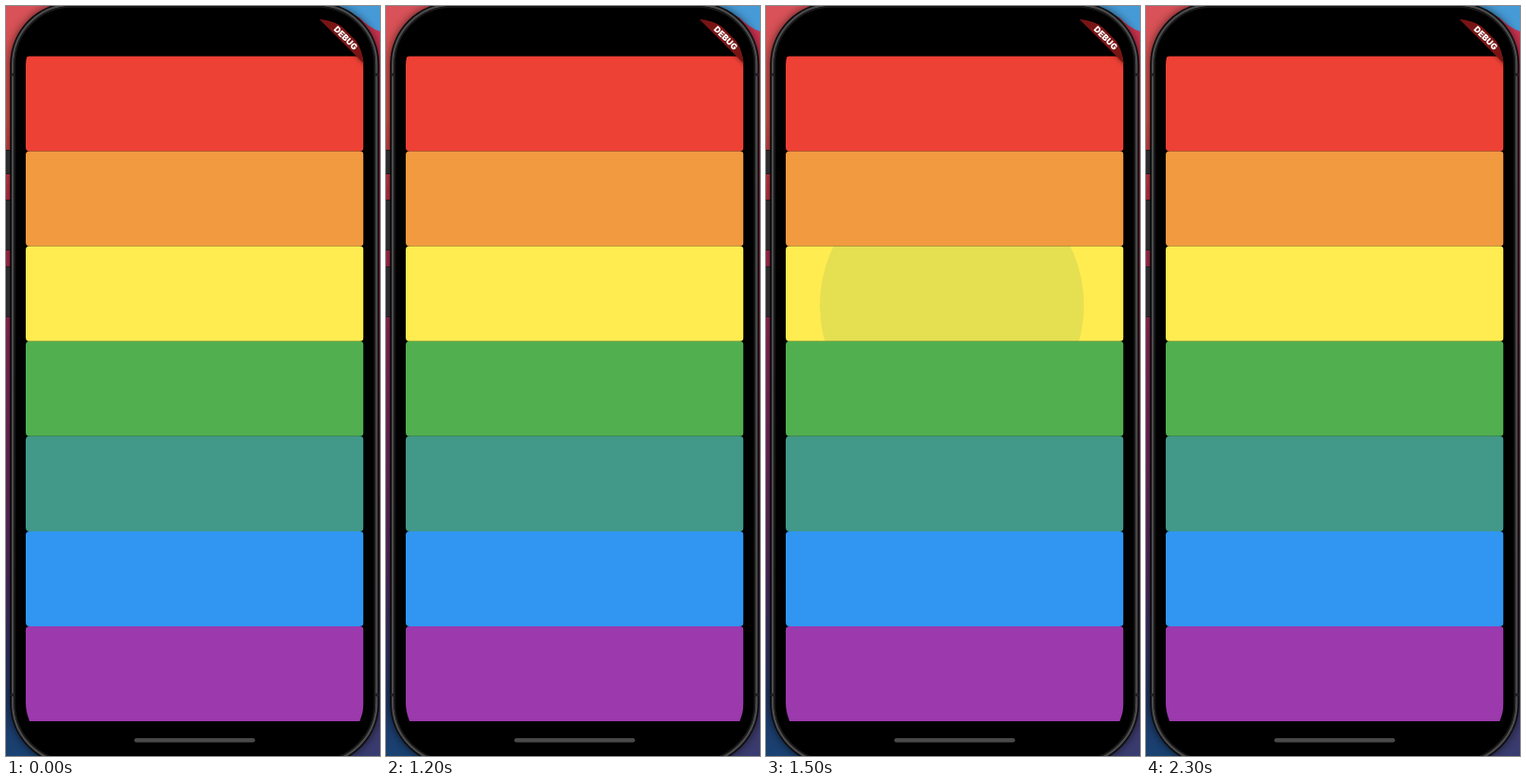
Write an HTML page that moves like this. It is 398 px wide and 798 px high and loops after 2400 ms.

```html
<!DOCTYPE html>
<html lang="en">
<head>
<meta charset="utf-8">
<title>Ripple on colour cards</title>
<style>
html, body { margin: 0; width: 100%; height: 100%; overflow: hidden; background: #000; }
svg { display: block; width: 398px; height: 798px; }
text { font: 900 9px Inter, Roboto, sans-serif; fill: #fff; }
</style>
</head>
<body>
<svg viewBox="0 0 398 798">
  <defs>
    <linearGradient id="left" x2="0" y2="1">
      <stop offset="0" stop-color="#d9525a"/>
      <stop offset=".15" stop-color="#cf5046"/>
      <stop offset=".25" stop-color="#bd3044"/>
      <stop offset=".45" stop-color="#8a2858"/>
      <stop offset=".75" stop-color="#522a60"/>
      <stop offset=".92" stop-color="#203666"/>
      <stop offset="1" stop-color="#194272"/>
    </linearGradient>
    <linearGradient id="right" x2="0" y2="1">
      <stop offset="0" stop-color="#cc3450"/>
      <stop offset=".4" stop-color="#b52c46"/>
      <stop offset=".7" stop-color="#5a2640"/>
      <stop offset="1" stop-color="#383c70"/>
    </linearGradient>
    <clipPath id="screen"><rect x="21" y="14" width="359.5" height="777" rx="50"/></clipPath>
    <filter id="blur" x="-20%" y="-60%" width="140%" height="220%"><feGaussianBlur stdDeviation="2.5"/></filter>
    <filter id="shadow"><feGaussianBlur stdDeviation="5"/></filter>
  </defs>

  <rect width="199" height="798" fill="url(#left)"/>
  <rect x="199" width="199" height="798" fill="url(#right)"/>
  <path d="M335 0H398V27Q386 23 376 12Z" fill="#469ad6"/>
  <rect x="4.3" y="-4" width="392.9" height="812" rx="66" opacity=".6" filter="url(#shadow)"/>

  <g fill="#2b2b2d" stroke="#1c1c1d" stroke-width="1">
    <rect x="-3" y="153.5" width="8" height="25"/>
    <rect x="-3" y="206.5" width="8" height="53"/>
    <rect x="-3" y="277.5" width="8" height="53"/>
  </g>

  <rect x="4.3" y="-4" width="392.9" height="812" rx="66" fill="#0c0c0d"/>
  <rect x="7.2" y="-1.1" width="387.1" height="806.2" rx="63" fill="#000" stroke="#4b4b4d" stroke-width="2.4"/>
  <rect x="9.2" y=".9" width="383.1" height="802.2" rx="61" fill="none" stroke="#1b1b1c" stroke-width="1.5"/>
  <path d="M4.3 73h5M4.3 733h5M392 73h5M392 733h5" stroke="#1e1e20" stroke-width="3"/>

  <g clip-path="url(#screen)">
    <g id="cards"></g>
    <g transform="translate(380.5 14) rotate(45)">
      <rect x="-37" y="22" width="74" height="11.3" opacity=".5" filter="url(#blur)"/>
      <rect x="-37" y="22" width="74" height="11.3" fill="#781514"/>
      <text x=".8" y="30.9" text-anchor="middle">DEBUG</text>
    </g>
  </g>
  <rect x="136.5" y="779" width="128.5" height="4.4" rx="2.2" fill="#484848"/>
</svg>
<script>
const LOOP = 2400, STEP = 100;
const HOLD_TIME = 1000, GROW_TIME = 225, FADE_IN = 75, FADE_OUT = 150;
const LEFT = 21, TOP = 53.4, WIDTH = 359.5, HEIGHT = 101.1;
const colors = ['#ee4135', '#f29a40', '#ffec50', '#51af50', '#429889', '#3096f2', '#9b39ad'];
const taps = [
  { card: 6, x: 193, y: 747, press: 490, release: 669 },
  { card: 2, x: 193, y: 338, press: 1280, release: 1459 },
];

// Each card is a rounded box that clips its own ripple.
document.getElementById('cards').innerHTML = colors.map((color, i) => {
  const box = `x="${LEFT}" y="${TOP + i * HEIGHT}" width="${WIDTH}" height="${HEIGHT}" rx="4"`;
  return `<clipPath id="clip${i}"><rect ${box}/></clipPath>
    <rect ${box} fill="${color}"/>
    <g clip-path="url(#clip${i})"><circle id="ripple${i}" fill="#006a60" opacity="0"/></g>`;
}).join('');

const clamp = v => Math.min(1, Math.max(0, v));
const mix = (a, b, k) => a + (b - a) * k;
const bezier = (a, b, s) => 3 * a * s * (1 - s) ** 2 + 3 * b * s * s * (1 - s) + s ** 3;

// cubic-bezier(.25, .1, .25, 1), solved by bisection
function ease(x) {
  let lo = 0, hi = 1;
  for (let i = 0; i < 24; i++) {
    const mid = (lo + hi) / 2;
    if (bezier(.25, .25, mid) < x) lo = mid; else hi = mid;
  }
  return bezier(.1, 1, lo);
}

// Grows slowly while pressed, quickly after release, then fades.
function drawRipple({ card, x, y, press, release }, t) {
  const held = Math.max(0, Math.min(t, release) - press) / HOLD_TIME;
  const freed = Math.max(0, t - release) / GROW_TIME;
  const k = ease(clamp(held + freed));
  const shown = clamp((t - press) / FADE_IN);
  const faded = clamp((t - release - GROW_TIME) / FADE_OUT);
  const attrs = {
    cx: mix(x, LEFT + WIDTH / 2, k),
    cy: mix(y, TOP + (card + .5) * HEIGHT, k),
    r: mix(57, 191, k),
    opacity: .1 * shown * (1 - faded),
  };
  const ripple = document.getElementById('ripple' + card);
  for (const name in attrs) ripple.setAttribute(name, attrs[name]);
}

const start = performance.now();
function tick() {
  const t = (performance.now() - start) % LOOP;
  const now = Math.floor(t / STEP) * STEP;
  taps.forEach(tap => drawRipple(tap, now));
  requestAnimationFrame(tick);
}
tick();
</script>
</body>
</html>
```
